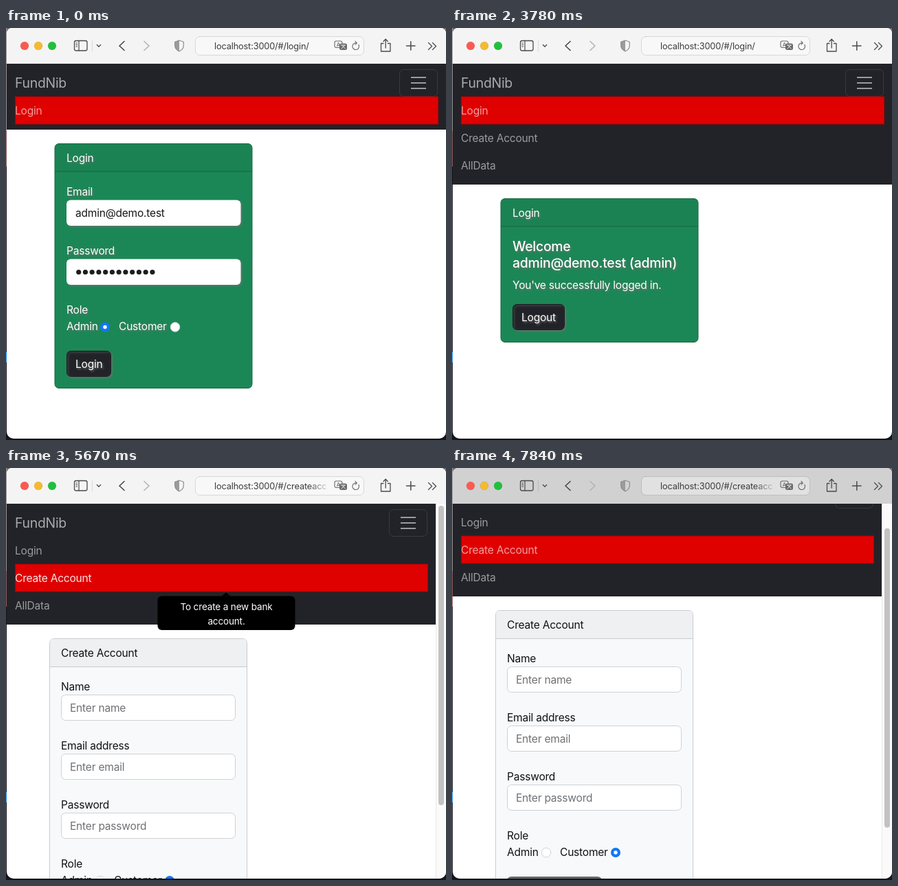
These frames come from a looping animation (640x600 px, 8000 ms). An HTML page with a canvas:

```html
<!DOCTYPE html>
<html lang="en">
<head>
<meta charset="utf-8">
<title>Bank login demo</title>
<style>
  html, body { margin: 0; width: 640px; height: 600px; overflow: hidden; }
  canvas { display: block; }
</style>
</head>
<body>
<canvas id="stage" width="640" height="600"></canvas>
<script>
const c = document.getElementById('stage').getContext('2d');
const LOOP = 8000, TICK = 70;
const BRAND = 'FundNib', MAIL = 'admin@demo.test';
const DARK = '#222328', GREEN = '#1c8756', BLUE = '#1278f5';

const clamp = v => Math.max(0, Math.min(1, v));
// Rises to 1 in n ticks, the first of them at start
const fade = (t, start, n) => clamp((t - start + TICK) / (n * TICK));
const white = a => `rgba(255,255,255,${a})`;
const black = a => `rgba(0,0,0,${a})`;
const mix = (a, b, k) => `rgb(${a.map((v, i) => Math.round(v + (b[i] - v) * k))})`;

function text(str, x, y, color, size = 16, weight = 400, align = 'left') {
  c.font = `${weight} ${size * 0.97}px Inter, "Liberation Sans", sans-serif`;
  c.letterSpacing = `${-size * 0.013}px`;
  c.textAlign = align;
  c.fillStyle = color;
  c.fillText(str, x, y);
}

function box(x, y, w, h, r, fill, stroke, line = 1) {
  c.beginPath();
  c.roundRect(x, y, w, h, r);
  if (fill) { c.fillStyle = fill; c.fill(); }
  if (stroke) { c.strokeStyle = stroke; c.lineWidth = line; c.stroke(); }
}

function disc(x, y, r, fill, stroke) {
  c.beginPath();
  c.arc(x, y, r, 0, 7);
  c.fillStyle = fill;
  c.fill();
  if (stroke) { c.strokeStyle = stroke; c.lineWidth = 1; c.stroke(); }
}

function path(color, width, ...points) {
  c.beginPath();
  points.forEach(([x, y], i) => i ? c.lineTo(x, y) : c.moveTo(x, y));
  c.strokeStyle = color;
  c.lineWidth = width;
  c.stroke();
}

function rect(x, y, w, h, fill) {
  c.fillStyle = fill;
  c.fillRect(x, y, w, h);
}

function shadow(on) {
  c.shadowColor = on ? 'rgba(110,115,112,.9)' : 'transparent';
  c.shadowOffsetX = c.shadowOffsetY = on ? 1.5 : 0;
  c.shadowBlur = on ? 3 : 0;
}

function radio(x, y, on) {
  disc(x, y, on ? 7 : 6.8, on ? BLUE : '#fff', on ? null : '#d2d3d5');
  if (on) disc(x, y, 2.7, '#fff');
}

function desktop() {
  rect(0, 0, 640, 600, '#15141d');
  rect(0, 0, 640, 20, '#6a696e');
  rect(0, 0, 1, 150, '#9a9496');
  rect(0, 150, 1, 52, '#8b5c5c');
  rect(0, 472, 1, 15, '#1a8cf0');
}

function toolbar(url, cut, tint) {
  rect(0, 0, 640, 52, '#f5f4f4');
  if (tint) {
    const g = c.createLinearGradient(0, 8, 0, 52);
    g.addColorStop(0, black(0.145 * tint ** 3));
    g.addColorStop(1, black(0.145 * tint));
    rect(0, 0, 640, 52, g);
  }
  ['#fb5a52', '#f6ba30', '#1fc13c'].forEach((col, i) => disc(27 + i * 20, 26, 6, col, black(0.08)));

  const ink = '#4b4b4c';
  c.lineCap = c.lineJoin = 'round';
  box(99.5, 18.5, 18.5, 14.5, 2.5, null, ink, 1.3);
  path(ink, 1.2, [106, 19], [106, 33]);
  for (const y of [22, 24.5, 27]) path(ink, 1, [101.8, y], [103.6, y]);
  path(black(0.1), 1, [125.5, 18], [125.5, 34]);
  path(ink, 1.3, [132.3, 24.5], [135, 27.2], [137.7, 24.5]);
  path(ink, 1.7, [172, 19.5], [165, 26], [172, 32.5]);
  path('#b4b4b5', 1.7, [201, 19.5], [208, 26], [201, 32.5]);

  const shield = new Path2D('M252 18 L258.3 20.2 V26 Q258 31 252 34 Q246 31 245.7 26 V20.2 Z');
  c.save();
  c.clip(shield);
  rect(244, 17, 8, 18, '#9b9b9c');
  c.restore();
  c.strokeStyle = '#8d8d8e';
  c.lineWidth = 1.2;
  c.stroke(shield);

  box(275.5, 12.5, 245, 27, 6.5, white(0.35), black(0.12));
  c.save();
  c.beginPath();
  c.rect(300, 13, cut ? 167 : 200, 26);
  c.clip();
  let ink2 = '#3b3b3c';
  if (cut) {
    ink2 = c.createLinearGradient(440, 0, 469, 0);
    ink2.addColorStop(0, '#3b3b3c');
    ink2.addColorStop(1, 'rgba(59,59,60,.1)');
  }
  text(url, 303, 31, ink2, 13.2);
  c.restore();

  box(478, 19, 11, 9.5, 2.5, null, '#6b6b6c', 1.1);
  text('A', 483.4, 26.8, '#6b6b6c', 8, 500, 'center');
  box(485, 22.5, 11, 9.5, 2.5, '#6b6b6c');
  path('#f4f4f4', 0.9, [487.5, 25], [493.5, 25]);
  path('#f4f4f4', 0.9, [492.5, 25.2], [488, 30]);
  path('#f4f4f4', 0.9, [488.8, 25.2], [493.3, 30]);

  c.beginPath();
  c.arc(508.7, 26.7, 4.8, -0.5, 4.9);
  c.strokeStyle = '#6b6b6c';
  c.lineWidth = 1.2;
  c.stroke();
  path('#6b6b6c', 1.2, [508, 19.3], [510.4, 21.8], [508, 24.2]);

  path(ink, 1.3, [549, 22.5], [545.5, 22.5], [545.5, 34], [559, 34], [559, 22.5], [555.5, 22.5]);
  path(ink, 1.3, [552.2, 29], [552.2, 16.5]);
  path(ink, 1.3, [549, 19.5], [552.2, 16.3], [555.4, 19.5]);
  path(ink, 1.5, [582.5, 26], [595, 26]);
  path(ink, 1.5, [588.8, 19.8], [588.8, 32.2]);
  for (const x of [614.5, 620.5]) path(ink, 1.3, [x, 21.5], [x + 5, 26.5], [x, 31.5]);
}

function navbar(width, links, active, glow) {
  rect(0, 52, width, 56 + 40 * links.length, DARK);
  text(BRAND, 13, 87, '#a9aaac', 20);
  const right = width - 12;
  box(right - 55.5, 60.5, 55, 39, 6, null, '#3a3b40');
  for (const y of [72, 80, 88]) path('#9a9b9e', 1.8, [right - 39, y], [right - 17, y]);
  links.forEach((label, i) => {
    const y = 100 + 40 * i;
    if (i === active) {
      rect(13, y - 0.5, right - 12, 41, '#a90206');
      rect(14, y + 0.5, right - 14, 39, '#df0000');
    }
    text(label, 13, y + 26, white((i === active ? 0.62 : 0.55) + 0.28 * (glow[i] || 0)));
  });
}

function greenCard(y, h) {
  box(71, y + 0.5, 287, h, 6, GREEN, '#15693f');
  rect(72, y + 1, 285, 40, black(0.03));
  rect(71, y + 40.5, 287, 1, '#14663f');
  shadow(true);
  text('Login', 88, y + 27, '#fff');
}

function button(x, y, w, label, fill) {
  box(x + 0.5, y + 0.5, w - 1, 37, 6, fill, '#1b1c20');
  text(label, x + 13, y + 25, '#fff');
}

function loginPage(t) {
  navbar(640, ['Login'], 0, []);
  greenCard(168, 356);
  text('Email', 88, 244, '#fff');
  text('Password', 88, 330, '#fff');
  text('Role', 88, 416, '#fff');
  text('Admin', 88, 440, '#fff');
  text('Customer', 164, 440, '#fff');
  for (const y of [250.5, 336.5]) box(88, y, 253.5, 37.5, 6, '#fff');
  const hover = mix([34, 35, 40], [65, 67, 70], fade(t, 1120, 3));
  const press = mix([65, 67, 70], [73, 74, 77], fade(t, 1540, 3));
  button(88, 470, 65, 'Login', t < 1540 ? hover : press);
  shadow(false);
  text(MAIL, 101, 275, '#17181a');
  for (let i = 0; i < 12; i++) disc(105.7 + i * 9.75, 355.5, 3.6, '#1c1d1f');
  radio(144, 435.5, true);
  radio(246, 435.5, false);
}

function welcomePage(t) {
  const allData = fade(t, 4620, 3) * (1 - fade(t, 4900, 3));
  const create = fade(t, 4900, 3);
  navbar(640, ['Login', 'Create Account', 'AllData'], 0, [0, create, allData]);
  greenCard(248, 209);
  text('Welcome', 88, 325, '#fff', 20, 500);
  text(MAIL + ' (admin)', 88, 349, '#fff', 20, 500);
  text("You've successfully logged in.", 88, 380, '#fff');
  button(88, 402, 76, 'Logout', t >= 4270 && t < 4410 ? '#2b2d31' : DARK);
  shadow(false);
  const rise = fade(t, 4550, 4) ** 1.25;
  tooltip(227, ['Display all account', 'information'], rise * (1 - fade(t, 4900, 3)), true);
  tooltip(186.5, ['To create a new bank', 'account.'], create);
}

function tooltip(y, lines, a, overCard) {
  if (a <= 0) return;
  box(220.5, y, 200, 49.5, 6, black(a));
  c.beginPath();
  c.moveTo(313.5, y);
  c.lineTo(320, y - 5);
  c.lineTo(326.5, y);
  c.fill();
  if (overCard && a < 1) rect(221, y + 25.5, 137, 23.5, black(0.3 * (1 - a)));
  lines.forEach((s, i) => text(s, 320.5, y + 20 + 21 * i, white(Math.sqrt(a) * (i && a < 0.9 ? 0.85 : 1)), 14, 400, 'center'));
}

function field(y, label, hint) {
  text(label, 80, y, '#111214');
  box(80.5, y + 6.5, 253, 37, 6, '#fff', '#ced2d6');
  text(hint, 93, y + 31, '#6f7174');
}

function createPage(t, scroll) {
  const out = 1 - fade(t, 6160, 3);
  rect(625, 52, 15, 548, '#fafafa');
  rect(625, 52, 1, 548, '#e9e9e9');
  box(629, 55 + scroll * 0.8, 8, 436, 4, '#c2c2c3');

  c.save();
  c.translate(0, -scroll);
  navbar(625, ['Login', 'Create Account', 'AllData'], 1, [0, out]);
  box(63.5, 248.5, 287, 460, 6, '#f7f9fb', '#c9cbce');
  box(64, 249, 286, 40, [5, 5, 0, 0], '#eff0f2');
  rect(64, 289, 286, 1, '#c9cbce');
  text('Create Account', 80, 275, '#111214');
  field(324, 'Name', 'Enter name');
  field(410, 'Email address', 'Enter email');
  field(496, 'Password', 'Enter password');
  text('Role', 80, 582, '#111214');
  text('Admin', 80, 606, '#111214');
  text('Customer', 157, 606, '#111214');
  radio(137, 601, false);
  radio(238, 601, true);
  box(80, 636, 138, 38, 6, '#67686b');
  c.restore();
  tooltip(186.5, ['To create a new bank', 'account.'], out);
}

function scrollAt(t) {
  if (t < 7490) return 0;
  if (t < 7630) return 4;
  if (t < 7700) return 15;
  return t < 7840 ? 26 : 41;
}

function draw(now) {
  const t = Math.floor((now % LOOP) / TICK + 1e-6) * TICK;
  const scroll = scrollAt(t), creating = t >= 5530;
  desktop();
  c.save();
  c.beginPath();
  c.roundRect(1, 0, 639, 598, [8, 8, 10, 10]);
  c.clip();
  rect(0, 0, 640, 600, '#fff');
  if (creating) createPage(t, scroll);
  else if (t >= 3780) welcomePage(t);
  else loginPage(t);
  toolbar('localhost:3000/#/' + (creating ? 'createaccount/' : 'login/'), creating, clamp((scroll - 4) / 37));
  c.restore();
}

const start = performance.now();
function tick() {
  draw(performance.now() - start);
  requestAnimationFrame(tick);
}
tick();
</script>
</body>
</html>
```
